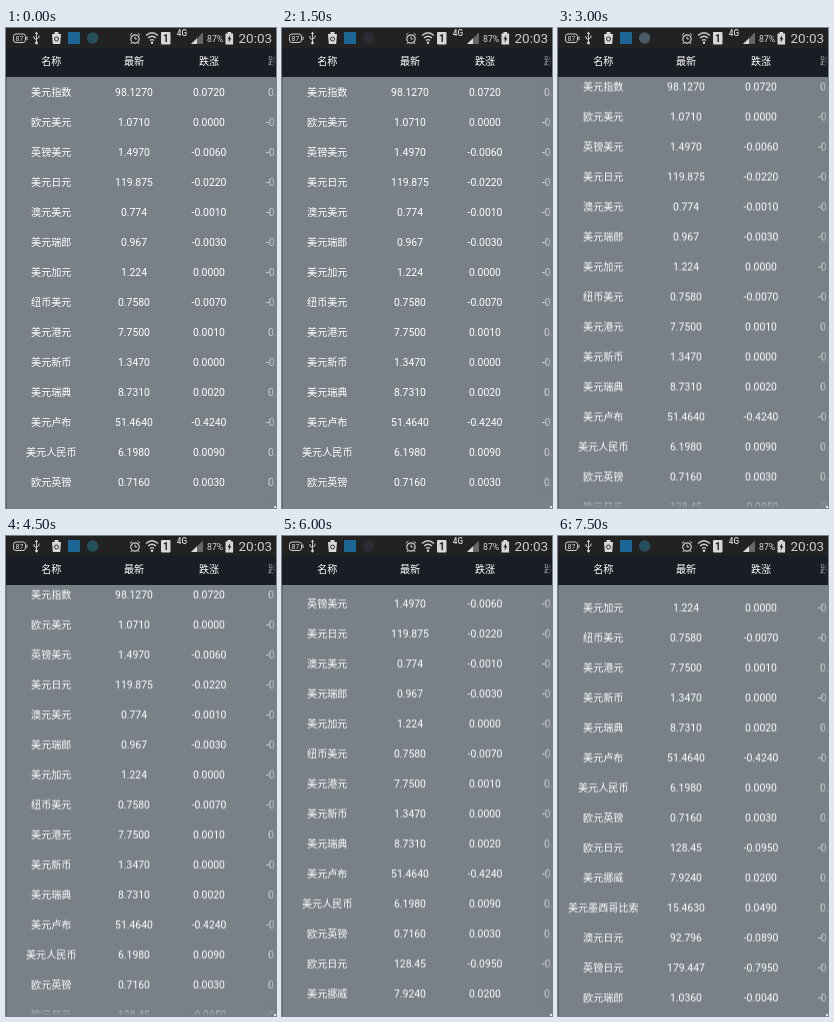
These frames come from a looping animation (270x480 px, 8 s). An HTML page:

```html
<!DOCTYPE html>
<html lang="zh-CN">
<head>
<meta charset="utf-8">
<title>外汇行情</title>
<style>
  html, body { margin: 0; width: 100%; height: 100%; overflow: hidden; background: #222; }
  #stage {
    position: relative; width: 270px; height: 480px; overflow: hidden; color: #fff;
    font: 10.4px Roboto, "Noto Sans CJK SC", "Noto Sans CJK", sans-serif;
  }
  #status { position: absolute; left: 0; top: 0; }
  #head, #view { position: absolute; left: 0; width: 270px; overflow: hidden; }
  #head { top: 20px; height: 29px; background: #191d24; }
  #head .row { height: 28px; line-height: 28px; }
  #view { top: 49px; height: 431px; background: #798087; box-shadow: inset 1px 0 #62686f; }
  .row { position: relative; height: 30px; line-height: 30px; white-space: nowrap; }
  .row span { position: absolute; top: 0; text-align: center; }
  .row :nth-child(1) { left: 0; width: 90.5px; font-size: 10.1px; }
  .row :nth-child(2) { left: 91px; width: 74px; }
  .row :nth-child(3) { left: 165px; width: 76px; }
  .row :nth-child(4) { left: 262px; }
  .row .neg:nth-child(4) { left: 260px; }
  #head span { font-size: 10.1px; }
  .fade { position: absolute; right: 0; bottom: 0; }
  .side { width: 11px; height: 100%; }
  .foot { width: 269px; height: 10px; background: linear-gradient(#79808700, #798087); }
  #head .side { background: linear-gradient(90deg, #191d2400, #191d24); }
  #view .side { background: linear-gradient(90deg, #79808700, #798087c0); }
  .corner { width: 2px; height: 2px; background: #e8e8e8; }

  #list { animation: scroll 8s step-end infinite; }
  @keyframes scroll {
    0% { transform: translateY(.5px); }
    37.5% { transform: translateY(-5px); }
    75% { transform: translateY(-56px); }
    93.75%, 100% { transform: translateY(-172px); }
  }
  #badge { animation: tint 8s step-end infinite; }
  @keyframes tint {
    0%, 56.25%, 93.75%, 100% { fill: #24505c; }
    18.75%, 75% { fill: #2b2c36; }
    37.5% { fill: #4a5a66; }
  }
</style>
</head>
<body>
<div id="stage">
  <svg id="status" width="270" height="20" fill="#d8d8d8" font-family="Roboto, sans-serif">
    <rect width="270" height="20" fill="#222"/>
    <g fill="none" stroke="#ccc">
      <rect x="7.5" y="6" width="12" height="8.5" rx="2.5"/>
      <path d="M21 8.5v3.5"/>
      <path d="M30.5 5v10M28 8v2.2l2.5 1.6M33 7.5v2l-2.5 1.6"/>
      <circle cx="129" cy="11" r="4.2" stroke-width="1.2"/>
      <path d="M129 8.5V11h2.2M123.9 7.4l2.4-2.4M134.1 7.4L131.7 5M126 14.5l-1.2 1.5M132 14.5l1.2 1.5"/>
      <path d="M140 7.5q6-5.4 12 0M142 10q4-3.5 8 0M144 12.4q2-1.7 4 0" stroke-width="1.3"/>
    </g>
    <text x="13.5" y="12.9" font-size="7" text-anchor="middle">87</text>
    <path d="M30.5 3.6l1.6 2.4h-3.2z"/>
    <circle cx="30.5" cy="15" r="1.4"/>
    <path d="M46 6h9l-.8 10h-7.4zM48.5 4h4v2h-4z"/>
    <circle cx="50.5" cy="11" r="2" fill="none" stroke="#333"/>
    <rect x="62" y="4" width="12" height="12" fill="#1d6796"/>
    <circle id="badge" cx="86.6" cy="10" r="5.7"/>
    <circle cx="146" cy="14.8" r="1.2"/>
    <rect x="155" y="4" width="9.5" height="12.5" rx="1"/>
    <text x="159.8" y="14" font-size="10" font-weight="700" text-anchor="middle" fill="#222">1</text>
    <text x="170.8" y="8" font-size="8.2" font-weight="500">4G</text>
    <path d="M185 16L197 4.5V16z" fill="#666"/>
    <path d="M185 16l6-5.8V16z"/>
    <text x="201" y="13.6" font-size="8.7">87%</text>
    <path d="M221.5 4h3.6v1.5h2V16.5h-7.6V5.5h2z"/>
    <path d="M224.2 7l-2.8 4.2h1.7l-.7 3.6 3-4.6h-1.7z" fill="#222"/>
    <text x="232.5" y="14.8" font-size="13.5" fill="#ccc">20:03</text>
  </svg>
  <div id="head">
    <div class="row"><span>名称</span><span>最新</span><span>跌涨</span><span>跌幅</span></div>
    <div class="fade side"></div>
  </div>
  <div id="view">
    <div id="list"></div>
    <div class="fade side"></div>
    <div class="fade foot"></div>
    <div class="fade corner"></div>
  </div>
</div>
<script>
  const quotes = `美元指数 98.1270 0.0720
欧元美元 1.0710 0.0000
英镑美元 1.4970 -0.0060
美元日元 119.875 -0.0220
澳元美元 0.774 -0.0010
美元瑞郎 0.967 -0.0030
美元加元 1.224 0.0000
纽币美元 0.7580 -0.0070
美元港元 7.7500 0.0010
美元新币 1.3470 0.0000
美元瑞典 8.7310 0.0020
美元卢布 51.4640 -0.4240
美元人民币 6.1980 0.0090
欧元英镑 0.7160 0.0030
欧元日元 128.45 -0.0950
美元挪威 7.9240 0.0200
美元墨西哥比索 15.4630 0.0490
澳元日元 92.796 -0.0890
英镑日元 179.447 -0.7950
欧元瑞郎 1.0360 -0.0040`;

  const row = line => {
    const [name, price, change] = line.split(" ");
    const up = change > 0;
    return `<div class="row"><span>${name}</span><span>${price}</span><span>${change}</span>` +
      `<span class="${up ? "pos" : "neg"}">${up ? "0.0%" : "-0.0%"}</span></div>`;
  };
  document.getElementById("list").innerHTML = quotes.split("\n").map(row).join("");
</script>
</body>
</html>
```
